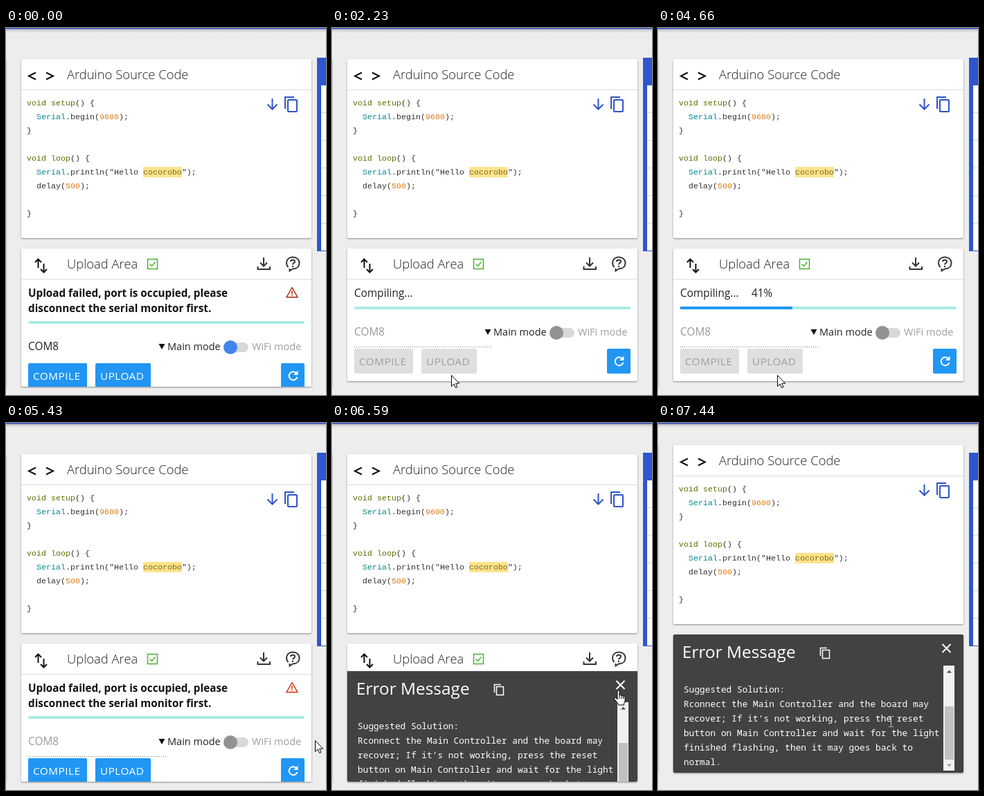
An HTML page that plays this animation: 462x531 px, repeating every 8000 ms.

```html
<!DOCTYPE html>
<html lang="en">
<head>
<meta charset="utf-8">
<title>Upload Area</title>
<style>
html, body { margin: 0; width: 100%; height: 100%; overflow: hidden; background: #ededed; }
svg { display: block; }
#stage { width: 100%; height: 100%; }
text { font-family: "Open Sans", "Noto Sans", sans-serif; font-size: 15.4px; fill: #212121; white-space: pre; }
.head { font-size: 18.4px; font-weight: 300; fill: #222; }
.bold { font-size: 15.25px; font-weight: 700; fill: #111; }
.mode { font-size: 14.5px; }
.btn { font-size: 15.3px; letter-spacing: .5px; }
.title { font-size: 24.4px; fill: #fff; }
.code text { font-family: "Liberation Mono", "DejaVu Sans Mono", monospace; font-size: 11.67px; fill: #333; }
.log text { font-family: "Noto Sans Mono", "DejaVu Sans Mono", monospace; font-size: 12.83px; fill: #fff; }
.kw { fill: #5e6d03; }
.obj { fill: #00878f; }
.num { fill: #e07a10; }
.mark { fill: #7d6a24; }
.card { fill: #fff; filter: drop-shadow(0 1.5px 1.2px rgba(0,0,0,.42)); }
.line { fill: none; stroke: #333; stroke-width: 2; }
</style>
</head>
<body>
<svg id="stage" viewBox="0 0 462 531" preserveAspectRatio="none">
  <defs>
    <linearGradient id="fade" x2="0" y2="1">
      <stop offset="0" stop-color="#000" stop-opacity=".22"/>
      <stop offset="1" stop-color="#000" stop-opacity="0"/>
    </linearGradient>
    <clipPath id="cardClip"><rect id="clipBox" x="22" y="319" width="419" height="200" rx="2"/></clipPath>
    <clipPath id="logClip"><rect y="45" width="419" height="152"/></clipPath>
  </defs>
  <rect width="462" height="531" fill="#ededed"/>

  <g id="page">
    <rect class="card" x="-20" y="45" width="20" height="474"/>
    <rect class="card" x="22" y="45" width="419" height="259" rx="2"/>
    <rect x="22" y="89" width="419" height="1" fill="#dcdcdc"/>
    <path class="line" stroke-width="2.4" style="stroke:#111" d="M43 64.5 33 69.5 43 74.5M58 64.5 68 69.5 58 74.5"/>
    <text class="head" x="88" y="74">Arduino Source Code</text>
    <g fill="none" stroke="#2f55c8" stroke-width="2">
      <path d="M384.500 102V117M377.500 110.500 384.500 117.500 391.500 110.500"/>
      <path d="M403 117V100H416"/>
      <rect x="407" y="104" width="13" height="17" rx="1"/>
    </g>
    <rect x="198" y="201" width="56" height="15" fill="#ffe38a"/>
    <g class="code">
      <text x="30" y="112"><tspan class="kw">void</tspan> <tspan class="kw">setup</tspan>() {</text>
      <text x="44" y="132"><tspan class="obj">Serial</tspan>.begin(<tspan class="num">9600</tspan>);</text>
      <text x="30" y="152">}</text>
      <text x="30" y="192"><tspan class="kw">void</tspan> <tspan class="kw">loop</tspan>() {</text>
      <text x="44" y="212"><tspan class="obj">Serial</tspan>.println("Hello <tspan class="mark">cocorobo</tspan>");</text>
      <text x="44" y="232">delay(<tspan class="num">500</tspan>);</text>
      <text x="30" y="272">}</text>
    </g>

    <rect id="card" class="card" x="22" y="319" width="419" height="200" rx="2"/>
    <g clip-path="url(#cardClip)">
      <rect x="22" y="363" width="419" height="1" fill="#dcdcdc"/>
      <path class="line" style="stroke:#111" d="M46.500 347V335M42 339 46.500 334.500 51 339M54.500 341V353M50 349 54.500 353.500 59 349"/>
      <text class="head" x="88" y="348">Upload Area</text>
      <g fill="none" stroke="#4caf32" stroke-width="1.500">
        <rect x="204.500" y="334.500" width="14" height="14"/>
        <path d="M207.500 341.500 210.500 344.500 215.500 338.500"/>
      </g>
      <path class="line" d="M372 332V344M367 339.500 372 344.500 377 339.500M363.500 345V349H381V345"/>
      <path class="line" d="M409.500 348V351.500L414 348.500C420 348.500 423.500 345 423.500 340S419.500 331.500 414 331.500 405 335 405 340Q405 343.500 407.500 346"/>
      <path class="line" d="M411 338Q411 335.500 414 335.500T417 338C417 340 414 340 414 342.500M414 344V346"/>

      <g id="failed">
        <text class="bold" x="32" y="388.500">Upload failed, port is occupied, please</text>
        <text class="bold" x="32" y="410.500">disconnect the serial monitor first.</text>
        <g id="warn" fill="none" stroke-width="1.500">
          <path d="M413 375.500 421 389.500H405Z" stroke-linejoin="round"/>
          <path d="M413 380V385M413 386V387.500"/>
        </g>
      </g>
      <g id="busy">
        <text x="32" y="389">Compiling...</text>
        <text id="pct" x="135" y="389"></text>
      </g>

      <g id="low">
        <rect x="32" y="403" width="399" height="4" rx="2" fill="#a9ebe3"/>
        <rect id="bar" x="32" y="403" width="0" height="4" rx="1" fill="#2196f3"/>
        <text id="port" x="32" y="444.500">COM8</text>
        <path id="dots" d="M32 461.500H231" stroke="#777" stroke-dasharray="1 2"/>
        <path d="M220.500 436H229.500L225 444Z" fill="#111"/>
        <text class="mode" x="233" y="445">Main mode</text>
        <rect x="316" y="434" width="34" height="14" rx="7" fill="#d8d8d8"/>
        <circle id="knob" cx="324" cy="441" r="10"/>
        <text class="mode" x="355" y="445" style="fill:#9e9e9e">WiFi mode</text>
        <g id="off"></g>
        <g id="on"></g>
        <rect x="397" y="464" width="34" height="36" rx="2" fill="#2196f3"/>
        <path d="M420 479.500A6 6 0 1 0 420.500 484" fill="none" stroke="#fff" stroke-width="2"/>
        <path d="M421.500 474.500V481H415Z" fill="#fff"/>
      </g>

      <g id="panel">
        <rect width="419" height="200" fill="#424242"/>
        <text class="title" x="13" y="34">Error Message</text>
        <g fill="none" stroke="#fff" stroke-width="1.500">
          <path d="M212.500 31V19.500H222"/>
          <rect x="215.500" y="22.500" width="10" height="12"/>
          <path stroke-width="2" d="M388.500 14 400.500 26M400.500 14 388.500 26"/>
        </g>
        <g id="log" class="log" clip-path="url(#logClip)"></g>
        <rect x="390" y="45" width="16" height="152" fill="#f1f1f1"/>
        <rect x="392" y="104" width="13" height="77" fill="#c1c1c1"/>
        <path d="M395 55.500H402L398.500 51.500Z" fill="#505050"/>
        <path d="M395 187.500H402L398.500 191.500Z" fill="#a3a3a3"/>
      </g>
    </g>
  </g>

  <g id="side"><rect x="449" y="43" width="13" height="280" fill="#2f55cf"/></g>
  <rect width="462" height="7" fill="url(#fade)"/>
  <rect width="462" height="1.500" fill="#2f50cc"/>

  <g id="cursor">
    <path id="hand" fill="#fff" stroke="#000" d="M6 14V2.600Q6 1 7.500 1T9 2.600V8.500Q9 7.400 10.600 7.400T12 9Q12 8.200 13.300 8.200T14.500 9.800Q14.700 9 15.800 9.200T17 11V15.500Q17 18 15.500 20V22H7.500V20.500L2 14Q1 12 2.500 11.500T6 14ZM9 8.500V13M12 9V13M14.500 10V13"/>
    <path id="arrow" fill="#fff" stroke="#000" d="M.5 .5V16.500L4.200 13 6.500 18.500 9 17.500 6.700 12.200H11.700Z"/>
    <path id="beam" fill="none" stroke="#c8c8c8" d="M0 .5H3M4 .5H7M3.500 1V15M0 15.500H3M4 15.500H7"/>
  </g>
</svg>

<script>
const LOOP = 8000, TICK = 76.75;
const $ = id => document.getElementById(id);
const NS = "http://www.w3.org/2000/svg";

function add(parent, tag, attrs, text = "") {
  const el = document.createElementNS(NS, tag);
  for (const key in attrs) el.setAttribute(key, attrs[key]);
  el.textContent = text;
  $(parent).append(el);
}

function buttons(parent, fill, ink) {
  for (const [x, w, label] of [[32, 85, "COMPILE"], [129, 80, "UPLOAD"]]) {
    add(parent, "rect", { x, y: 464, width: w, height: 36, rx: 2, fill });
    add(parent, "text", { x: x + 7, y: 487.5, class: "btn", style: "fill:" + ink }, label);
  }
}
buttons("off", "#dfdfdf", "#9f9f9f");
buttons("on", "#2196f3", "#fff");

["Board stopped.", "", "Suggested Solution:",
 "Rconnect the Main Controller and the board may",
 "recover; If it's not working, press the reset",
 "button on Main Controller and wait for the light",
 "finished flashing, then it may goes back to",
 "normal."
].forEach((line, i) => add("log", "text", { x: 15, y: 42 + 21 * i }, line));

for (let i = 0; i < 6; i++)
  add("side", "rect", { x: 455, y: 83 + 40 * i, width: 7, height: 39, fill: "#fff" });
for (let i = 1; i < 6; i++)
  add("side", "rect", { x: 455, y: 82 + 40 * i, width: 7, height: 1, fill: "#d5d5d5" });

// Each row: time, values...
const PATH = [
  [0, 411, 540, "hand"], [290, 411, 525, "hand"], [460, 411, 511, "hand"],
  [600, 411, 511, "hand"], [680, 375, 510, "arrow"], [915, 216, 504, "arrow"],
  [1060, 216, 504, "arrow"], [1061, 200, 503, "hand"], [1100, 200, 503, "hand"],
  [1380, 168, 502, "hand"], [1450, 172, 502, "arrow"], [5260, 172, 502, "arrow"],
  [5261, 167, 502, "hand"], [5290, 167, 502, "hand"], [5350, 310, 488, "arrow"],
  [5440, 446, 459, "arrow"], [5460, 446, 459, "arrow"], [5600, 452, 436, "arrow"],
  [5900, 425, 410, "arrow"], [6040, 410, 401, "arrow"], [6110, 406, 388, "hand"],
  [6190, 406, 386, "hand"], [6700, 406, 386, "hand"], [6720, 410, 386, "arrow"],
  [6900, 345, 420, "beam"], [6960, 333, 424, "beam"]
];
const BAR = [[3080, 0], [3880, 27], [4190, 33], [4410, 33], [4650, 40.6]];
const PCT = [[3080, 1], [3860, 33], [4410, 33], [4430, 41]];
const ENABLED = [[1400, 1], [1610, 0], [4810, 0], [5030, 1]];
const SCROLL = [[7220, 0], [7437, 13]];
const BUSY = [1400, 4780], OPEN = [6320, 400];

function at(keys, t) {
  const n = keys.findIndex(k => k[0] > t);
  if (n === 0) return keys[0].slice(1);
  if (n < 0) return keys[keys.length - 1].slice(1);
  const a = keys[n - 1], b = keys[n], u = (t - a[0]) / (b[0] - a[0]);
  return a.slice(1).map((v, i) => typeof v === "number" ? v + (b[i + 1] - v) * u : v);
}

const set = (id, key, value) => $(id).setAttribute(key, value);
const show = (id, on) => set(id, "visibility", on ? "visible" : "hidden");
const move = (id, x, y) => set(id, "transform", `translate(${x} ${y})`);
const easeInOut = u => u < .5 ? 2 * u * u : 1 - 2 * (1 - u) ** 2;

function draw(time) {
  const t = time < 300 ? 0 : 300 + Math.floor((time - 300) / TICK + .25) * TICK;
  const busy = t >= BUSY[0] && t < BUSY[1], fresh = t < BUSY[0];

  move("page", 0, -at(SCROLL, t)[0]);
  set("card", "height", busy ? 192 : 200);
  set("clipBox", "height", busy ? 192 : 200);
  show("failed", !busy);
  show("busy", busy);
  set("warn", "stroke", fresh ? "#a3260b" : "#dd2c0c");
  $("pct").textContent = t >= PCT[0][0] ? Math.round(at(PCT, t)[0]) + "%" : "";

  move("low", 0, busy ? 0 : 21);
  set("bar", "width", busy ? 3.99 * at(BAR, t)[0] : 0);
  $("port").style.fill = fresh ? "#212121" : "#9a9a9a";
  show("dots", !fresh);
  set("knob", "fill", fresh ? "#4285e8" : "#929292");
  set("on", "opacity", at(ENABLED, t)[0]);

  const u = Math.min(1, Math.max(0, (t - OPEN[0]) / OPEN[1]));
  show("panel", u > 0);
  move("panel", 22, 519 - 200 * easeInOut(u));

  const [x, y, kind] = at(PATH, t);
  move("cursor", Math.round(x), Math.round(y));
  for (const id of ["hand", "arrow", "beam"]) show(id, id === kind);
}

const start = performance.now();
function loop() {
  draw((performance.now() - start) % LOOP);
  requestAnimationFrame(loop);
}
loop();
</script>
</body>
</html>
```
